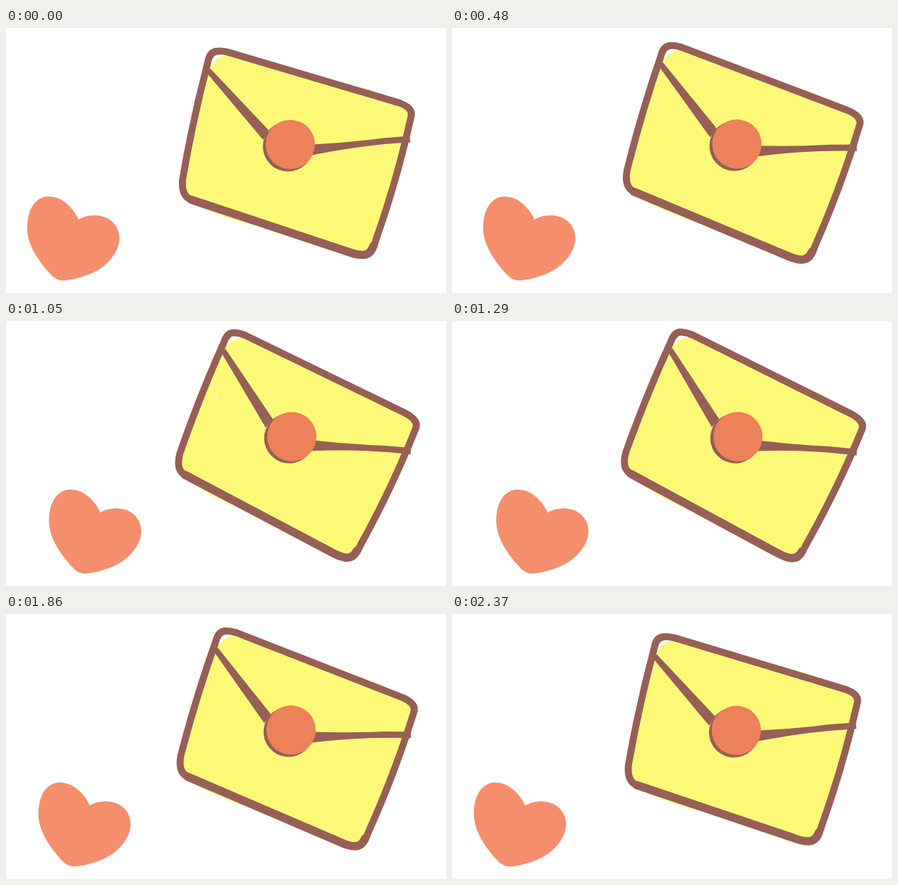
Recreate the animation shown at these times as an HTML page. Size 618 by 372 pixels, loop 2.4 s.

```html
<!DOCTYPE html>
<html lang="en">
<head>
<meta charset="utf-8">
<title>Letter and heart</title>
<style>
  html, body { margin: 0; width: 100%; height: 100%; overflow: hidden; background: #fff; }
  svg { display: block; width: 100vw; height: 100vh; }
  .paper { fill: #fdf977; }
  .ink { fill: #975f56; }
  .line { fill: none; stroke: #975f56; stroke-linecap: round; stroke-linejoin: round; }
</style>
</head>
<body>
<svg viewBox="0 0 618 372">
  <defs>
    <path id="rim" d="M248 213Q262 130 283.500 48Q286 32.500 298 32.500Q304 32 312 34L552 105Q572 112 569 124Q550 211 520 296Q514 319 502 318.500Q494 319 480 314L260 241Q246 236 248 213Z"/>
  </defs>
  <path id="heart" fill="#f58e6d" d="M102 269C94 252 79 236.500 60 236.500C42 236.500 29.700 254 29.700 280C29.700 303 44 325 62 345C66 350 73 355 82 354.500C96 353 110 349 121 344C143 334 159.300 314 159.300 295C159.300 277 145 263 125 263C116 263 108 265 102 269Z"/>
  <g id="letter">
    <use href="#rim" class="paper"/>
    <path class="paper" d="M460 74Q520 87 562 106ZM270 250Q310 268 352 278Z"/>
    <path fill="#fff" d="M286 52L288 36L304 35L306 39Q294 41 290 52Z"/>
    <path fill="none" stroke="#fffbe0" stroke-width="1.200" d="M286 121L285.300 128"/>
    <use href="#rim" class="line" stroke-width="9.800"/>
    <path class="line" stroke-width="11.600" d="M260 241L480 314Q494 319 502 318.500Q512 318 516 306"/>
    <path class="ink" d="M287 57L369 143.500L361 157L282 63Z"/>
    <path class="ink" d="M430 163.500Q480 161 530 154.500L567 151.500L568 160.500Q500 164 430 178.500Z"/>
    <circle class="ink" cx="396" cy="166.300" r="35.200"/>
    <circle cx="399.300" cy="163.500" r="34.600" fill="#ed8159"/>
  </g>
</svg>
<script>
const LOOP = 2400, STEP = 30;
const SHIFT = 35, TURN = 10.8, PIVOT = "407 176";

const heart = document.getElementById("heart");
const letter = document.getElementById("letter");

// Both parts swing out and back at constant speed, in 30 ms steps.
function draw(ms) {
  const t = Math.floor((ms % LOOP) / STEP) * STEP;
  const p = 1 - Math.abs(1 - 2 * t / LOOP);
  heart.setAttribute("transform", `translate(${SHIFT * p} 0)`);
  letter.setAttribute("transform", `rotate(${TURN * p} ${PIVOT})`);
}

const start = performance.now();
function tick() {
  draw(performance.now() - start);
  requestAnimationFrame(tick);
}
tick();
</script>
</body>
</html>
```
